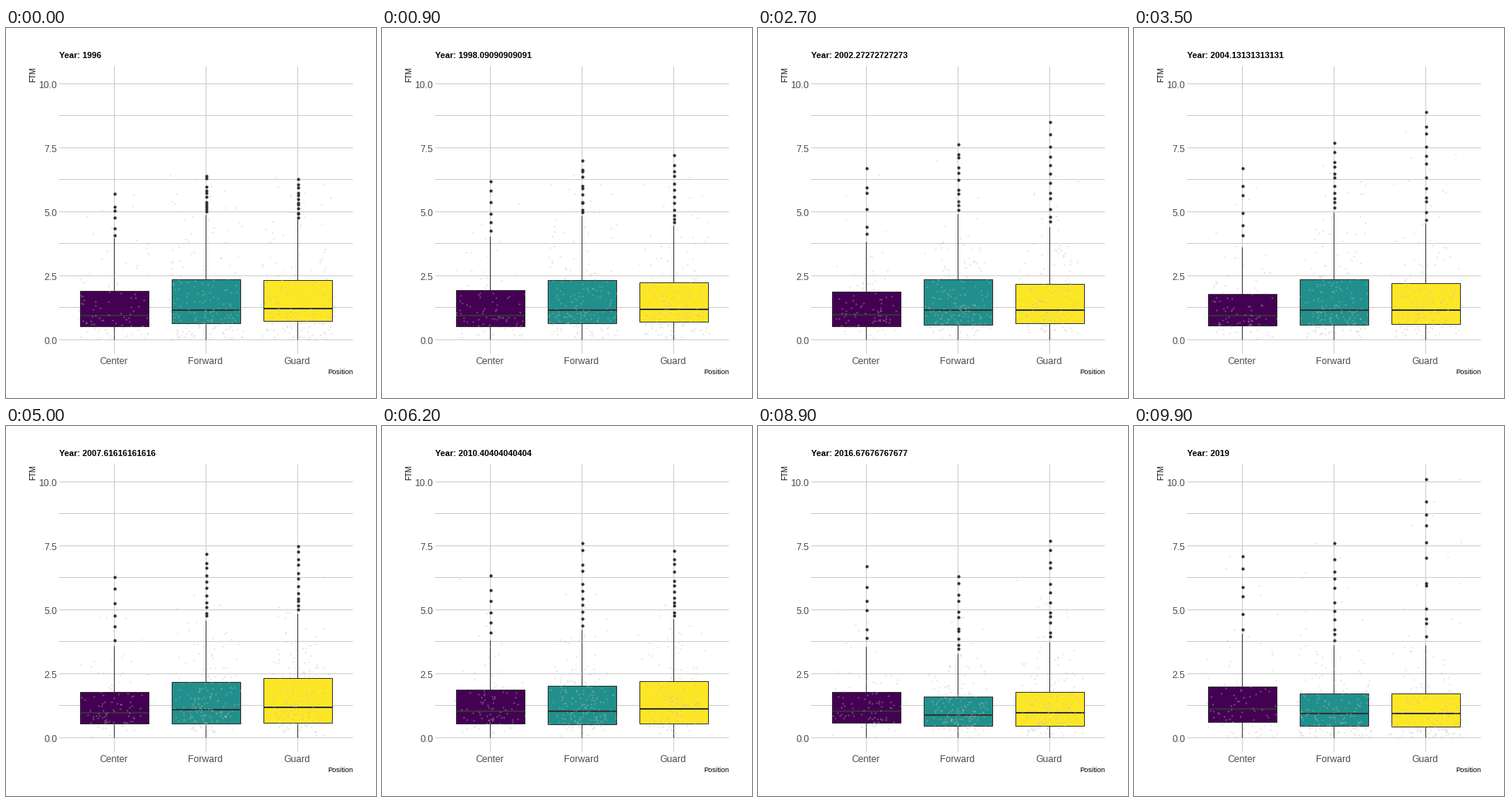
A matplotlib script for the animation above (10 s loop, 480 by 480 pixels).

```python
import numpy as np
import matplotlib.pyplot as plt
from matplotlib.animation import FuncAnimation
from matplotlib.patches import Rectangle

plt.rcParams["font.family"] = "Liberation Sans"
plt.rcParams["path.snap"] = False

FRAMES, START, SPAN = 100, 1996, 23
LEFT, RIGHT, TOP, BOTTOM = 69, 450, 50, 422
ZERO, UNIT = 404.2, 33.2
INK, GRID, LABEL = "#333333", "#cccccc", "#4d4d4d"
JITTER_X, JITTER_Y = 47.6, 0.04

# Turning points of the upper quartile and the maximum, as loop fractions
TURNS = [0, .18, .354, .505, .747, .9, 1]


def to_y(value):
    return ZERO - UNIT * value


def pixel(y):
    return np.floor(y) + 0.5


def tween(values, t):
    """Linear blend through one value per season."""
    k = min(int(t * SPAN), SPAN - 1)
    f = t * SPAN - k
    return (1 - f) * values[k] + f * values[k + 1]


class Group:
    def __init__(self, ax, name, x, color, lower, upper, peak, outliers,
                 count, seed):
        self.x, self.lower, self.upper, self.peak = x, lower, upper, peak
        self.rng = np.random.default_rng(seed)
        seasons = np.arange(SPAN + 1) / SPAN
        self.ranks = np.array([self.spread(outliers) for _ in seasons])
        self.clouds = np.array([self.sample(t, count) for t in seasons])

        self.box = Rectangle((x - 44, 0), 89, 1, fc=color, ec=INK, lw=1,
                             zorder=3)
        ax.add_patch(self.box)
        ax.plot([x, x], [TOP, BOTTOM], color=GRID, lw=1, zorder=1)
        self.whisker, = ax.plot([], [], color=INK, lw=1, zorder=2,
                                solid_capstyle="butt")
        self.median, = ax.plot([], [], color=INK, lw=2, zorder=4,
                               solid_capstyle="butt")
        self.dots = ax.scatter([], [], s=4.1 ** 2, c=INK, lw=0, zorder=4)
        self.cloud = ax.scatter([], [], s=2.1 ** 2, c="#bebebe", alpha=0.42,
                                lw=0, zorder=5)
        ax.text(x - 0.7, 436, name, size=12.3, color=LABEL, ha="center")

    def spread(self, n):
        """Outlier heights from 0 (whisker) to 1 (maximum), denser below."""
        steps = np.arange(1, n) + self.rng.uniform(-0.5, 0.5, n - 1)
        return np.append((steps / n) ** 1.3, 1)

    def stats(self, t):
        q1 = np.interp(t, [0, 1], self.lower)
        q3 = np.interp(t, TURNS, self.upper)
        med = q1 + (0.31 + 0.08 * t) * (q3 - q1)
        fence = q3 + 1.5 * (q3 - q1) - 0.06
        return q1, med, q3, fence

    def outliers(self, t):
        base = self.stats(t)[3] + 0.06
        return base + (np.interp(t, TURNS, self.peak) - base) * tween(
            self.ranks, t)

    def sample(self, t, count):
        """Jittered cloud of one season, drawn from the box quantiles."""
        q1, med, q3, fence = self.stats(t)
        far = self.outliers(t)
        n = count - len(far)
        last = n / count
        rank = (np.arange(n) + 0.5) / count
        body = np.interp(rank, [0, .25, .5, .75, (.75 + last) / 2, last],
                         [0, q1, med, q3, q3 + 0.38 * (fence - q3), fence])
        y = self.rng.permutation(np.append(body, far))
        y += self.rng.uniform(-JITTER_Y, JITTER_Y, count)
        x = self.x + self.rng.uniform(-JITTER_X, JITTER_X, count)
        return np.column_stack([x, to_y(y)])

    def draw(self, t):
        q1, med, q3, fence = to_y(np.array(self.stats(t)))
        self.box.set_y(pixel(q3))
        self.box.set_height(pixel(q1) - pixel(q3))
        self.whisker.set_data([self.x] * 2, [pixel(fence), pixel(ZERO)])
        self.median.set_data([self.x - 44, self.x + 45], [np.round(med)] * 2)
        ys = pixel(to_y(self.outliers(t)))
        self.dots.set_offsets(np.column_stack([np.full(len(ys), self.x), ys]))
        self.cloud.set_offsets(tween(self.clouds, t))


fig = plt.figure(figsize=(480 / 72, 480 / 72), dpi=72, facecolor="white")
ax = fig.add_axes([0, 0, 1, 1])
ax.set(xlim=(0, 480), ylim=(480, 0))
ax.axis("off")

for k in range(9):
    y = pixel(to_y(k * 1.25))
    ax.plot([LEFT, RIGHT], [y, y], color=GRID, lw=1, zorder=1,
            solid_capstyle="butt")
    if k % 2 == 0:
        ax.text(66.3, y + 5.2, f"{k * 1.25:.1f}", size=12.3, color=LABEL,
                ha="right")

groups = [
    Group(ax, "Center", 140.5, "#440154", lower=(.49, .58),
          upper=[1.9, 1.96, 1.78, 1.78, 1.96, 1.78, 1.99],
          peak=[5.7, 6.7, 6.7, 6.3, 6.4, 6.7, 7.1],
          outliers=6, count=95, seed=3),
    Group(ax, "Forward", 259.5, "#21908c", lower=(.63, .43),
          upper=[2.35, 2.3, 2.35, 2.17, 1.84, 1.6, 1.72],
          peak=[6.4, 7.6, 7.7, 7.2, 8, 6.3, 7.6],
          outliers=11, count=185, seed=5),
    Group(ax, "Guard", 378.5, "#fde725", lower=(.71, .42),
          upper=[2.32, 2.1, 2.2, 2.3, 2.08, 1.78, 1.72],
          peak=[6.3, 8.1, 8.9, 7.5, 7.1, 7.7, 10.1],
          outliers=12, count=175, seed=8),
]

ax.text(RIGHT, 449, "Position", size=9.3, ha="right")
ax.text(38.2, TOP, "FTM", size=9.5, rotation=90, ha="right", va="baseline",
        rotation_mode="anchor")
title = ax.text(LEFT, 39, "", size=11, weight="bold")


def update(i):
    t = i / (FRAMES - 1)
    title.set_text(f"Year: {START + SPAN * t:.15g}")
    for g in groups:
        g.draw(t)


anim = FuncAnimation(fig, update, frames=FRAMES, interval=100, repeat=True,
                     repeat_delay=0, init_func=lambda: update(0))
plt.show()
```
